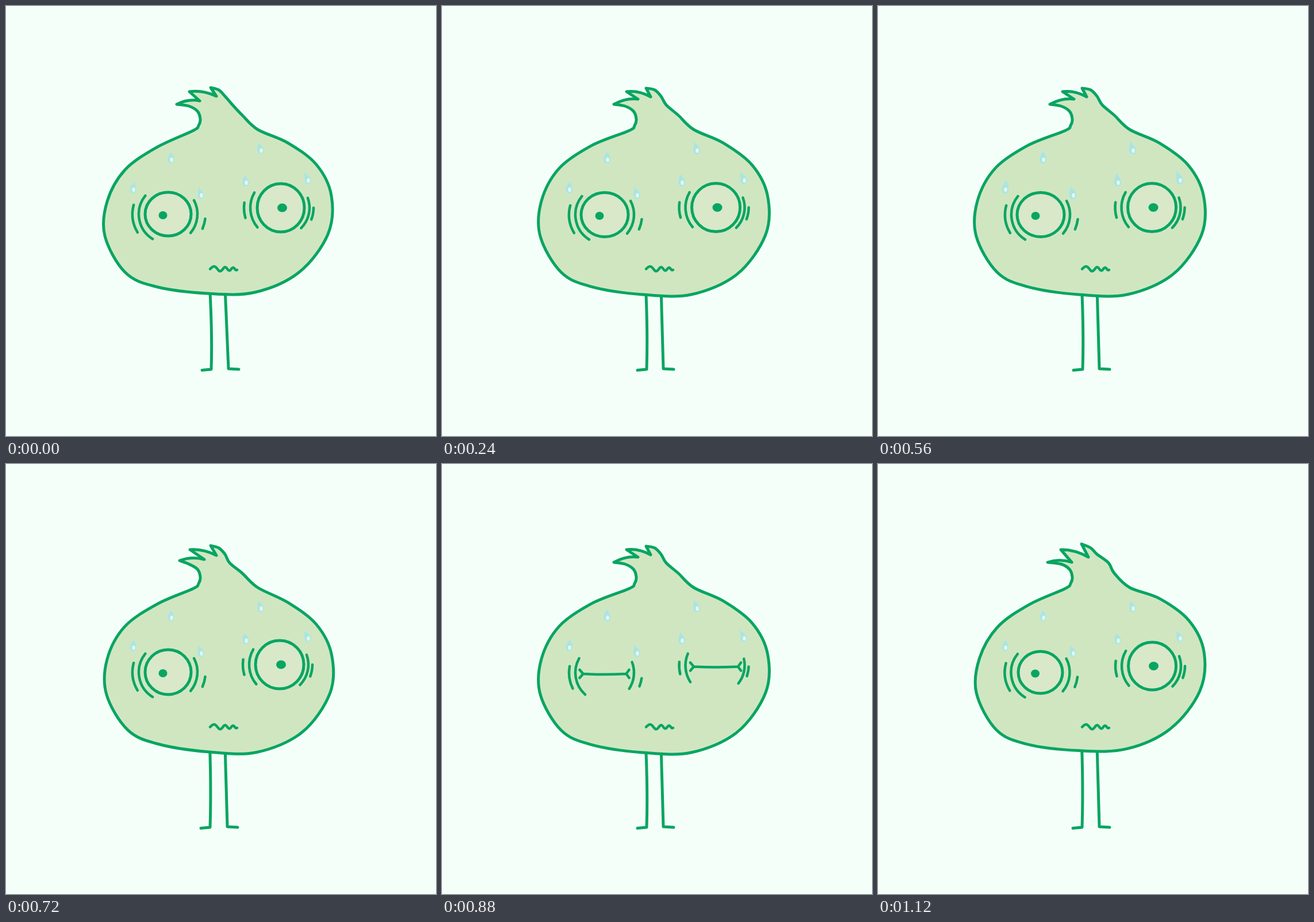
These frames come from a looping animation (748 px wide and 748 px high, 1.2 s). An HTML page:

```html
<!DOCTYPE html>
<html lang="en">
<head>
<meta charset="utf-8">
<title>Worried onion</title>
<style>
html, body { margin: 0; width: 100%; height: 100%; overflow: hidden; background: #f5fffa; }
svg { display: block; width: 100%; height: 100%; }
.ink { fill: none; stroke: #08a562; stroke-width: 5; stroke-linecap: round; stroke-linejoin: round; }
.thin { stroke-width: 4.5; }
.skin { fill: #d0e6c1; }
.eye { fill: #d8e8c9; }
.pupil { fill: #08a562; }
.drop { fill: #aee3db; stroke: #ace8e5; stroke-width: 1.5; stroke-linejoin: round; }
.shine { fill: #dff8f2; }
</style>
</head>
<body>
<svg id="stage" viewBox="0 0 748 748"></svg>
<script>
const points = text => text.split(' ').map(p => p.split(',').map(Number));

// Outline keys, counterclockwise from the tuft
const neck = points('318,174 333,183 338,197 335,208 325,217');
const belly = points('262,246 207,285 176,340 172,400 207,463 260,488 350,500 433,498 510,463 560,397 566,330 540,276 490,238');
const nape = points('438,215 411,190');
const crown = points('381,157 370,146');

// The redrawn poses that make the line boil.
// sway: shift x, shift y, growth, diagonal skew of the belly
// tuft: shoulder, then tip, notch, tip, notch, tip
// eyes: centre and radii; ankles: left x, right x
const poses = [
  {
    sway: [0, 0, 0, 0], ankles: [357, 387],
    tuft: points('394,172 356,142 366,157 319,149 337,165 297,171'),
    eyes: [[282, 362, 40, 38], [478, 351, 41, 42]]
  },
  {
    sway: [2, 1, 0.5, 3.5], ankles: [355, 385],
    tuft: points('389,172 356,142 366,159 320,149 345,166 302,168'),
    eyes: [[282, 362, 40, 39], [476, 349, 42, 42]]
  },
  {
    sway: [0, -2, 0.3, -1.5], ankles: [355, 385],
    tuft: points('401,172 354,139 366,162 318,149 337,171 295,171'),
    eyes: [[282.5, 362.5, 38.5, 36.5], [477, 351.5, 41.5, 41.5]]
  },
  {
    sway: [0, 0.5, 2, 2.5], ankles: [356, 385],
    tuft: points('390,172 355,143 363,158 321,149 341,162 299,171'),
    eyes: [[283, 363, 41, 38.5], [476.5, 350.5, 42, 42]]
  }
];

// Arcs around each eye: radius, from and to in degrees
const rings = [
  [[51, 122, 219], [62, 149, 195], [51, -28, 40], [65, 7, 23]],
  [[53, 140, 210], [64, 164, 188], [50, -20, 45], [57, 0, 21]]
];
const pupils = [[-9, 2, 7.5, 7], [2.5, 0, 8.5, 7.5]];

// Bulb x, y and sideways lean of the tip
const drops = [[287, 267, 0], [443, 251, -4], [221, 319, 2], [339, 329, -4], [417, 307, -2], [525, 303, -6]];

const step = 80, steps = 15, blinkStep = 11;

const path = (cls, d) => `<path class="${cls}" d="${d}"/>`;
const ellipse = (cls, x, y, rx, ry) => `<ellipse class="${cls}" cx="${x}" cy="${y}" rx="${rx}" ry="${ry}"/>`;

// Catmull-Rom spline through the points, as cubic segments
function spline(pts) {
  const at = i => pts[Math.max(0, Math.min(pts.length - 1, i))];
  const ctrl = (p, from, to) => p.map((v, k) => v + (to[k] - from[k]) / 6);
  return 'M' + pts[0] + pts.slice(1).map((p, i) =>
    `C${ctrl(at(i), at(i - 1), p)} ${ctrl(p, at(i + 2), at(i))} ${p}`).join('');
}

function warp([x, y], [dx, dy, grow, skew]) {
  const a = Math.atan2((y - 375) / 126, (x - 370) / 198);
  const out = grow + skew * Math.sin(2 * a);
  return [x + dx + out * Math.cos(a), y + dy + out * Math.sin(a)];
}

function drawBody({ sway, tuft }) {
  const [shoulder, tip, ...spikes] = tuft;
  const outline = [tuft[5], ...neck, ...belly.map(p => warp(p, sway)), ...nape, shoulder, ...crown, tip];
  let d = spline(outline), from = tip;
  spikes.forEach((p, i) => {
    const lift = i % 2 ? 7 : 0; // strands arch towards their tips
    d += `Q${(from[0] + p[0]) / 2} ${(from[1] + p[1]) / 2 - lift} ${p}`;
    from = p;
  });
  return path('ink skin', d + 'Z');
}

function drawLegs([left, right]) {
  return path('ink', `M354.5 490Q${left + 2} 570 ${left} 632l-16 1.5M381 490L${right} 631l18 1`);
}

function drawRing([x, y], [r, from, to], sweep) {
  const mid = (from + to) / 2, half = (to - from) / 2 * sweep;
  const at = deg => {
    const a = deg * Math.PI / 180;
    return `${x + r * Math.cos(a)} ${y + r * Math.sin(a)}`;
  };
  return path('ink thin', `M${at(mid - half)}A${r} ${r} 0 0 1 ${at(mid + half)}`);
}

function drawEye(eye, side, shut) {
  const [x, y, rx] = eye;
  const [px, py, prx, pry] = pupils[side];
  const l = x - rx + 3.5, r = x + rx - 3.5, lid = y + 2;
  const ball = shut
    ? path('ink thin', `M${l} ${lid}Q${x} ${lid + 2} ${r} ${lid}M${l - 6} ${lid - 7}l6 7l-6 7M${r + 5} ${lid - 7}l-5 7l5 7`)
    : ellipse('ink eye', ...eye) + ellipse('pupil', x + px, y + py, prx, pry);
  return ball + rings[side].map(ring => drawRing(eye, ring, shut ? 0.8 : 1)).join('');
}

// Three humps that shrink and crowd together to the right
function drawMouth() {
  const pts = Array.from({ length: 25 }, (_, i) => {
    const u = i / 24;
    return [355 + 47 * u, 457.5 - (5 - 3 * u) * Math.sin(2 * Math.PI * (1.45 + 1.4 * u) * u)];
  });
  return path('ink thin', spline(pts));
}

function drawDrop([x, y, lean], size) {
  const r = 5 + size * 0.8, tip = `${x + lean} ${y - 12 - 3 * size}`;
  return path('drop', `M${tip}Q${x - r} ${y - 5} ${x - r} ${y}A${r} ${r + 1} 0 0 0 ${x + r} ${y}Q${x + r} ${y - 5} ${tip}Z`)
    + ellipse('shine', x + 1, y + 0.5, 2.8, 4);
}

function draw(i) {
  const pose = poses[i % 4];
  const size = Math.sin(Math.PI / 4 * (i % 5)) ** 2;
  return drawLegs(pose.ankles)
    + drawBody(pose)
    + drops.map(d => drawDrop(d, size)).join('')
    + pose.eyes.map((eye, side) => drawEye(eye, side, i === blinkStep)).join('')
    + drawMouth();
}

const stage = document.getElementById('stage');
let shown = -1;
function tick() {
  const i = Math.floor(performance.now() / step) % steps;
  if (i !== shown) stage.innerHTML = draw(shown = i);
  requestAnimationFrame(tick);
}
tick();
</script>
</body>
</html>
```
